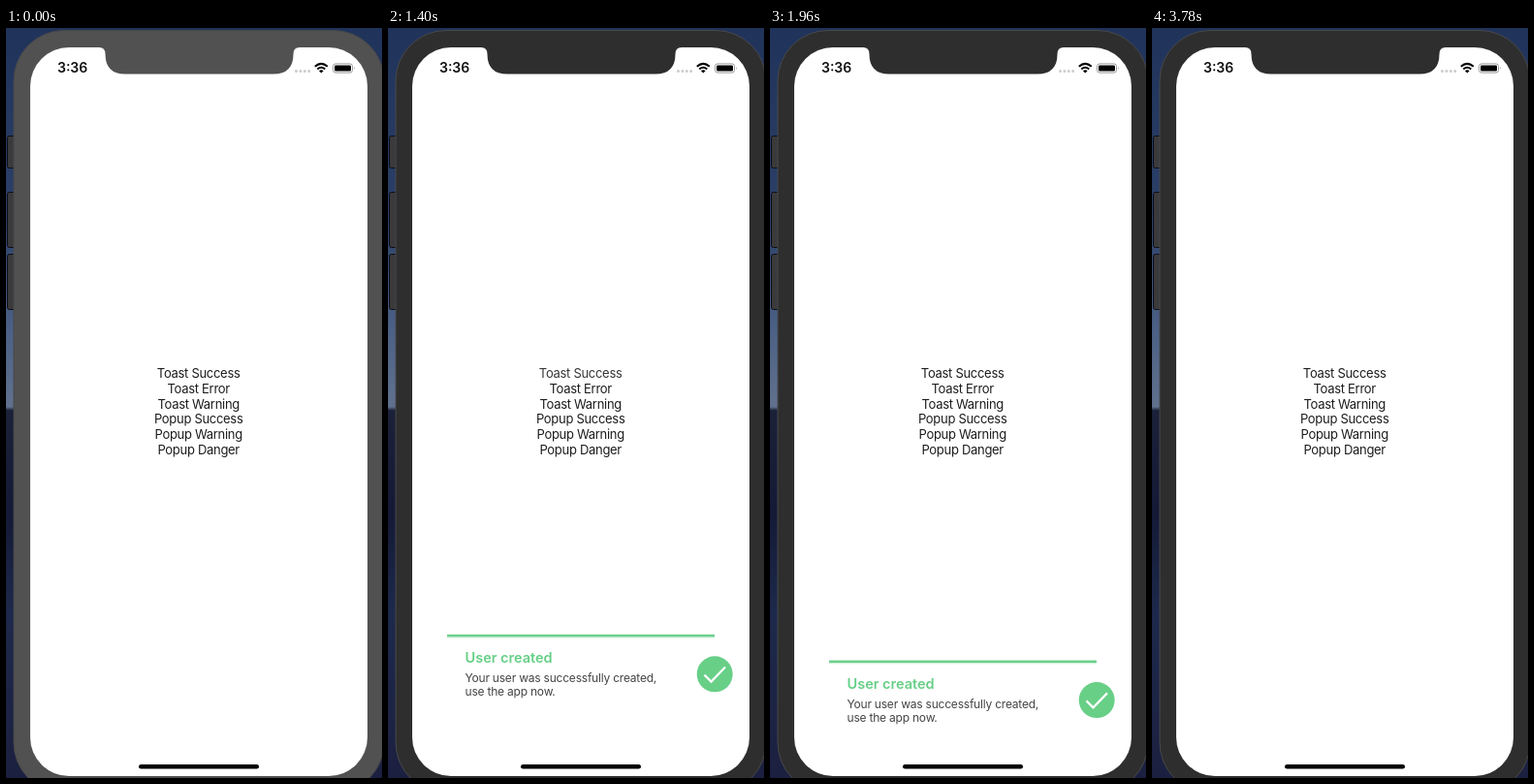
An HTML page that plays this animation: 388x774 px, repeating every 3850 ms.

```html
<!DOCTYPE html>
<html lang="en">
<head>
<meta charset="utf-8">
<title>Toast demo</title>
<style>
html, body { margin: 0; width: 100%; height: 100%; overflow: hidden; }
svg { display: block; width: 388px; height: 774px; font-family: Inter, Roboto, sans-serif; }
.list { font-size: 13px; letter-spacing: -.3px; text-anchor: middle; fill: #1c1c1c; }
.clock { font-size: 14px; font-weight: 600; fill: #111; }
.title { font-size: 14.5px; font-weight: 600; fill: #66cf86; }
.note { font-size: 12px; letter-spacing: -.21px; fill: #444; }
</style>
</head>
<body>
<svg viewBox="0 0 388 774">
  <defs>
    <linearGradient id="sky" x2="0" y2="1">
      <stop offset="0" stop-color="#20335a"/>
      <stop offset=".25" stop-color="#2b4068"/>
      <stop offset=".4" stop-color="#4b6085"/>
      <stop offset=".505" stop-color="#60718e"/>
      <stop offset=".51" stop-color="#1b2138"/>
      <stop offset=".65" stop-color="#141a36"/>
      <stop offset=".78" stop-color="#1d294c"/>
      <stop offset="1" stop-color="#1c2040"/>
    </linearGradient>
    <clipPath id="screen"><rect x="25" y="20" width="348" height="752" rx="40"/></clipPath>
  </defs>

  <rect width="388" height="774" fill="url(#sky)"/>
  <g fill="#3a3a3c" stroke="#0c0c12">
    <rect x="1.5" y="111.5" width="9" height="33" rx="2"/>
    <rect x="1.5" y="169.5" width="9" height="57" rx="2"/>
    <rect x="1.5" y="233.5" width="9" height="57" rx="2"/>
  </g>

  <g id="phone">
    <rect x="8" y="2.5" width="382" height="787" rx="52" fill="currentColor" stroke="#48484a"/>
    <g clip-path="url(#screen)">
      <rect x="25" y="20" width="348" height="752" fill="#fff"/>
      <g class="list" id="list"></g>
      <g id="toast">
        <path d="M61 .3H337" stroke="#6bd08c" stroke-width="4" opacity=".3"/>
        <path d="M61 0H337" stroke="#6bd08c" stroke-width="2.2"/>
        <text class="title" x="79.5" y="28">User created</text>
        <text class="note" x="79.5" y="48">Your user was successfully created,</text>
        <text class="note" x="79.5" y="62.3">use the app now.</text>
        <circle cx="337.2" cy="39.7" r="18.5" fill="#68cf87"/>
        <path d="M326.5 40.5L333.5 47.5L348 32.5" fill="none" stroke="#fff" stroke-width="2.2"/>
      </g>
      <rect x="137" y="760" width="124" height="4.6" rx="2.3"/>
    </g>
    <path d="M96 19H303V20Q296.500 20 296.500 27Q296.500 47.500 276 47.500H123Q102.500 47.500 102.500 27Q102.500 20 96 20Z" fill="currentColor"/>
  </g>

  <text class="clock" x="53" y="46.300">3:36</text>
  <path d="M299.500 44.500H314" stroke="#ccc" stroke-width="3" stroke-linecap="round" stroke-dasharray="0 4.400"/>
  <g fill="none" stroke="#000" stroke-width="2">
    <path d="M318.800 39.800Q325.300 34 331.800 39.800M321.300 42.400Q325.300 39 329.300 42.400"/>
  </g>
  <path d="M323 44.200Q325.300 42.400 327.600 44.200L325.300 46.500Z"/>
  <rect x="337.500" y="36.900" width="20" height="9.200" rx="2.600" fill="none" stroke="#999"/>
  <rect x="339" y="38.400" width="17" height="6.200" rx="1.400"/>
  <path d="M359 40Q360.500 41.500 359 43Z" fill="#999"/>
</svg>
<script>
const LOOP = 3850, STEP = 70;
const FOCUS = 1120, PRESS = 1190, SHOW = 1210, HIDE = 3267;
const REST = 653.6, BELOW = 774, GONE = 820;
const [phone, list, toast] = ['phone', 'list', 'toast'].map(id => document.getElementById(id));

const labels = ['Toast Success', 'Toast Error', 'Toast Warning',
  'Popup Success', 'Popup Warning', 'Popup Danger'];
list.innerHTML = labels.map((s, i) =>
  `<text x="198.7" y="${361 + i * 15.75}">${s}</text>`).join('');

const clamp = x => Math.min(1, Math.max(0, x));
const easeInOut = x => x < .5 ? (2 * x) ** 1.7 / 2 : 1 - (2 - 2 * x) ** 1.7 / 2;

// Remaining distance (1 to 0) of an underdamped spring after s seconds
function spring(s) {
  const decay = 8.025, freq = 16.66;
  return Math.exp(-decay * s) * (Math.cos(freq * s) + decay / freq * Math.sin(freq * s));
}

function toastY(t) {
  if (t < SHOW) return GONE;
  if (t < HIDE) return REST + (BELOW - REST) * spring((t - SHOW) / 1000);
  return REST + (GONE - REST) * easeInOut(clamp((t - HIDE) / 500));
}

function draw(now) {
  const t = Math.floor(now % LOOP / STEP) * STEP;
  phone.setAttribute('color', t < FOCUS ? '#515151' : '#2e2e2e');
  toast.setAttribute('transform', `translate(0 ${toastY(t).toFixed(2)})`);
  const fade = t < PRESS ? 1 : .2 + .8 * easeInOut(clamp((t - SHOW) / 250));
  list.firstChild.setAttribute('opacity', fade);
  requestAnimationFrame(draw);
}
draw(performance.now());
</script>
</body>
</html>
```
